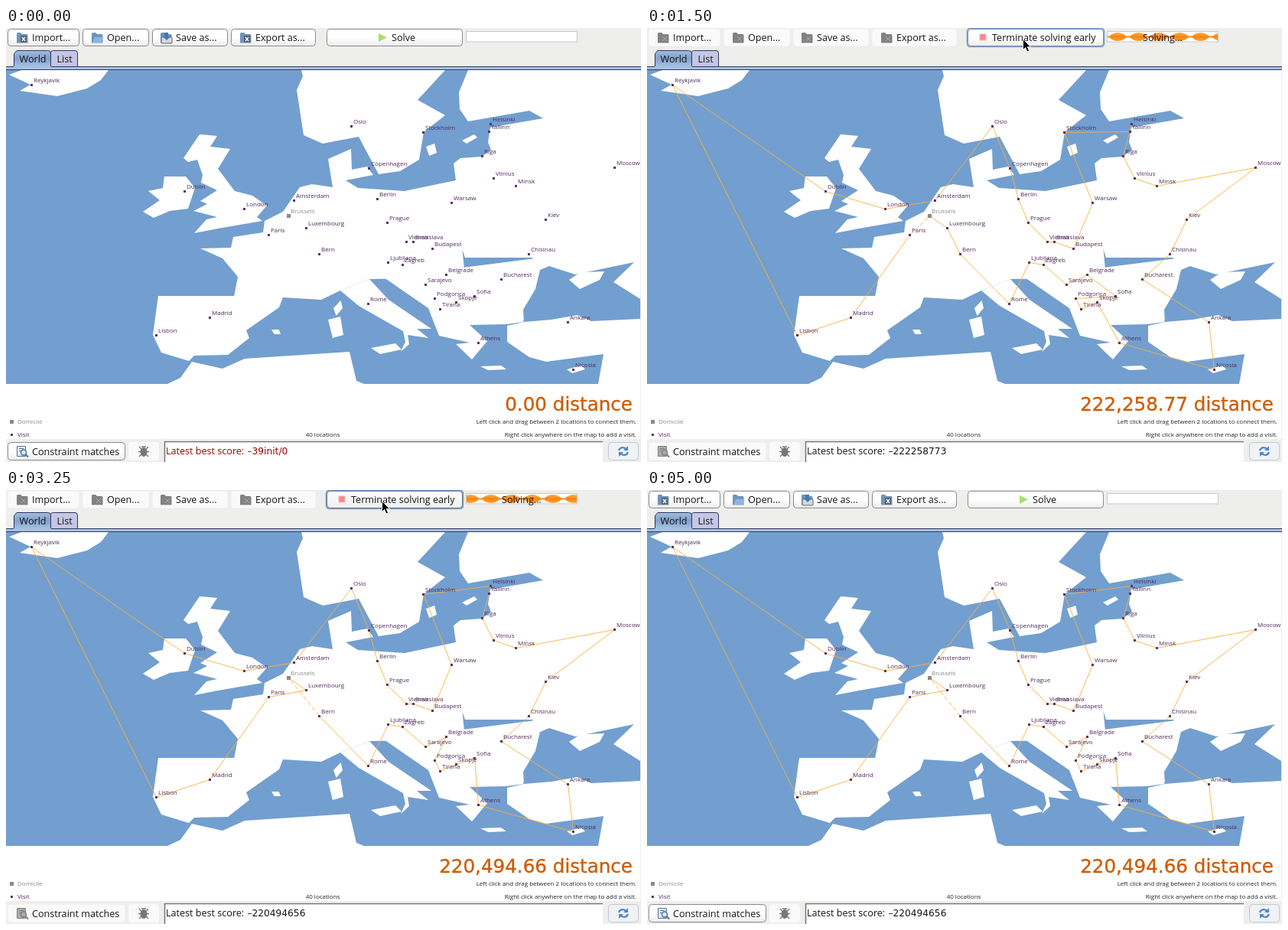
Animation, 830 px wide and 567 px high, one loop 5.25 s. Source, as an HTML page:

```html
<!DOCTYPE html>
<html lang="en">
<head>
<meta charset="utf-8">
<title>Route planner</title>
<style>
html, body { margin: 0; width: 100%; height: 100%; overflow: hidden; background: #eee; }
svg { display: block; }
text { font-family: "Open Sans", "Noto Sans", sans-serif; font-size: 12.6px; fill: #161616; white-space: pre; }
.map text { font-size: 8px; fill: #1e2426; }
.map .city { fill: #5c3566; }
.map text.city { fill: #4e2859; }
.map .home { fill: #888a85; }
.map .total { font: 24.6px "DejaVu Sans", sans-serif; fill: #ce5c00; stroke: #ce5c00; stroke-width: .35; }
.num { font: 12.2px "DejaVu Sans", sans-serif; }
.red text { fill: #a40000; }
.end { text-anchor: end; }
.mid { text-anchor: middle; }
.land { fill: #fff; }
.sea { fill: #729fcf; }
.route { fill: none; stroke: #fcaf3e; stroke-width: .9; }
.face { fill: url(#face); stroke: #8b8b8b; }
.flat { fill: #fafafa; }
</style>
</head>
<body>
<svg width="830" height="567" viewBox="0 0 830 567">
<defs>
  <linearGradient id="face" x2="0" y2="1">
    <stop offset=".5" stop-color="#fff"/><stop offset="1" stop-color="#ececec"/>
  </linearGradient>
  <linearGradient id="hot" x2="0" y2="1">
    <stop offset="0" stop-color="#fff"/><stop offset="1" stop-color="#eee"/>
  </linearGradient>
  <linearGradient id="tab" x2="0" y2="1">
    <stop offset="0" stop-color="#a3bcdf"/><stop offset=".5" stop-color="#81a1cb"/><stop offset="1" stop-color="#a3bfe3"/>
  </linearGradient>
  <linearGradient id="amber" x2="0" y2="1">
    <stop offset="0" stop-color="#ffb050"/><stop offset=".5" stop-color="#f88510"/><stop offset="1" stop-color="#ffa43c"/>
  </linearGradient>
  <clipPath id="barClip"><rect x="602" y="6" width="144" height="11"/></clipPath>
  <clipPath id="mapClip"><rect y="55" width="829" height="482"/></clipPath>
  <path id="folder" d="M0 2.500Q0 1 1.500 1H5L7 3H13Q14.500 3 14.500 4.500V14.500H0Z"/>
</defs>
<rect width="830" height="567" fill="#eeeeed"/>
<g id="tools"></g>

<g stroke="#30365e">
  <path d="M58.500 50V32.500Q58.500 29.500 61.500 29.500H90Q93.500 29.500 93.500 33V50" fill="#c6c6e6"/>
  <path d="M10.500 50V33.500L14 29.500H54.500Q58.500 29.500 58.500 33V50" fill="url(#tab)"/>
</g>
<rect y="50" width="830" height="5" fill="#a5c0e2"/>
<path d="M0 50.500H10M59 50.500H830M0 54.500H830" stroke="#343c5c"/>
<text x="17.500" y="45">World</text>
<text x="66.500" y="45">List</text>

<g class="map" clip-path="url(#mapClip)">
  <rect class="land" y="55" width="829" height="482"/>
  <rect class="sea" y="55" width="829" height="410"/>
  <g id="land"></g>
  <g id="routes"></g>
  <g id="cities"></g>
  <rect x="5" y="512" width="5" height="5" fill="#888a85"/>
  <rect x="6" y="530" width="3" height="3" fill="#5c3566"/>
  <text class="home" x="15" y="517">Domicile</text>
  <text class="city" x="15" y="534">Visit</text>
  <text class="mid" x="414" y="534">40 locations</text>
  <text class="end" x="824" y="517">Left click and drag between 2 locations to connect them.</text>
  <text class="end" x="824" y="534">Right click anywhere on the map to add a visit.</text>
</g>

<rect x="207" y="539" width="573" height="28" fill="#fff"/>
<path d="M207.500 567V540.500H780" fill="none" stroke="#73736f" stroke-width="1.500"/>
<g id="scores"></g>

<rect class="flat" x="160" y="541" width="40" height="24" rx="4"/>
<g fill="#777" stroke="#777">
  <ellipse cx="180" cy="554" rx="4" ry="5.500"/>
  <path d="M174 547L186 560M186 547L174 560M173 553.500H187M177 547H183" fill="none" stroke-width="1.300"/>
</g>
<rect x="787.500" y="541.500" width="39" height="23" rx="4" fill="#f0f2f5" stroke="#c3c8ce"/>
<g fill="none" stroke="#4b86cc" stroke-width="2.300">
  <path d="M801 552Q803 547 808 548.500L811 550M813 554Q811 559 806 557.500L803 556"/>
  <path d="M813 546V552H807ZM801 560V554H807Z" fill="#4b86cc" stroke="none"/>
</g>

<rect x="601.500" y="4.500" width="145" height="13.500" fill="#fff" stroke="#c9c9c9"/>
<g data-on="1000-4000">
  <path id="wave" fill="url(#amber)" clip-path="url(#barClip)"/>
  <text class="mid" x="674" y="16.500">Solving...</text>
</g>
<path data-on="750-4500" d="M491.500 14.500V28.500L494.600 25.600L497 31L499.600 29.900L497.300 24.700H501.500Z" fill="#000" stroke="#fff" stroke-width=".9"/>
</svg>

<script>
const LOOP = 5250, START = 1000, STOP = 4000;
const $ = id => document.getElementById(id);
const add = (id, html) => $(id).insertAdjacentHTML("beforeend", html);
const during = (from, to, html) => `<g data-on="${from}-${to}">${html}</g>`;
const idle = html => during(0, START, html) + during(STOP, LOOP, html);
const busy = html => during(START, STOP, html);
const box = (x, y, w, h, attrs) =>
  `<rect x="${x + .5}" y="${y + .5}" width="${w - 1}" height="${h - 1}" rx="4" ${attrs}/>`;
const label = (x, y, s, cls = "") => `<text class="${cls}" x="${x}" y="${y}">${s}</text>`;

// Toolbar
const tool = (x, w, name, textX, mark) => {
  const icon = (color, top) =>
    `<g transform="translate(${textX - 20} 5)"><use href="#folder" fill="${color}"/>${top}</g>`;
  add("tools",
    idle(box(x, 1, w, 23, 'class="face"') + icon("#6f93bd", mark)) +
    busy(box(x, 1, w, 23, 'class="flat"') + icon("#828282", '<path d="M6 6L12 12M12 6L6 12" stroke="#a9a9a9"/>')) +
    label(textX, 17, name));
};
const cross = '<rect x="5" y="5" width="8" height="9" fill="#5b626c"/><path d="M7 7L11 12M11 7L7 12" stroke="#fff" stroke-width="1.300"/>';
const lid = '<path d="M1 14L4 7H15.500L13 14Z" fill="#8db4e2"/>';
const drop = '<rect x="1" y="7" width="14" height="8" rx="1" fill="#d5d9de" stroke="#666"/><path d="M5 1H10V6H13L8 11L3 6H5Z" fill="#3f7ab8"/>';
tool(2, 94, "Import...", 34, cross);
tool(100, 87, "Open...", 132, lid);
tool(191, 99, "Save as...", 222, drop);
tool(294, 111, "Export as...", 326, cross);

// Solve / terminate button
const ring = box(418, 0, 180, 25, 'fill="none" stroke="#7b9dca" stroke-width="1.600"');
const hot = stroke => box(419, 1, 178, 23, `fill="url(#hot)" stroke="${stroke}"`);
add("tools",
  box(419, 1, 178, 23, 'class="face"') +
  during(500, 1250, hot("#8b8b8b")) + during(2750, STOP, hot("#5d6f68")) +
  during(750, START, ring) + during(1250, 5000, ring) +
  idle('<path d="M487 7L498 12.500L487 18Z" fill="#a5e06c"/>' + label(504, 17, "Solve")) +
  busy('<rect x="435" y="8" width="8" height="8" fill="#f48a8a" stroke="#f9b5b5"/>' +
    label(451, 17, "Terminate solving early")));

// Constraint matches button
const sheet = (page, ink) =>
  `<g fill="${page}" stroke="${ink}"><path d="M14.500 546.500H25.500V559.500H14.500ZM17 549.500H23M17 552.500H20"/>
   <circle cx="23" cy="554.500" r="3.500" stroke-width="1.500"/><path d="M25.500 557L29 560.500" stroke-width="2"/></g>`;
add("tools",
  idle(box(2, 541, 154, 24, 'class="face"') + sheet("#e3edf8", "#4d7299")) +
  busy(box(2, 541, 154, 24, 'class="flat"') + sheet("#aaa", "#808080")) +
  label(34, 557.5, "Constraint matches"));

// Map: each coast is a few key points, small islands are skewed quads
const poly = (points, cls = "land") => add("land", `<polygon class="${cls}" points="${points}"/>`);
const isle = (x, y, w, h, skew = 0) =>
  poly([x - w, y + skew, x + w * .6, y - h, x + w, y - skew, x - w * .4, y + h]);

const iceland = "20 55 134 55 124 68 106 79 67 89 18 82 32 74 4 61";
const ireland = "207 194 235 194 247 209 238 236 214 239 193 248 179 240 201 225 186 213 205 209";
const britain = "253 139 276 141 267 155 293 158 277 184 299 213 322 219 341 232 328 247 335 252 277 262 246 268 262 250 276 247 245 239 263 230 254 226 276 212 255 202 257 192 250 172 238 175 232 170";
const scandinavia = "386 55 388 63 380 81 389 140 414 151 461 142 487 191 515 187 540 172 546 136 574 114 538 94 574 55";
const east = "604 55 592 84 593 106 604 122 684 108 702 118 633 130 630 149 634 159 622 168 594 170 585 177 588 199 570 209 600 300 829 300 829 55";
const north = "588 199 521 213 460 209 444 199 480 192 472 181 452 185 451 158 421 171 427 208 400 204 384 208 362 240 338 252 336 267 297 273 294 287 254 288 283 301 303 325 298 351 362 352 412 355 437 343 475 328 600 326";
const iberia = "199 350 192 401 203 424 239 435 246 428 290 427 318 405 314 395 357 365 370 330 298 350";
const italy = "437 343 461 363 519 396 522 410 516 423 527 413 525 401 552 405 537 393 556 393 500 355 475 328";
const balkans = "494 326 552 366 566 402 606 411 588 413 609 433 629 409 606 388 654 387 676 384 700 300";
const anatolia = "655 389 655 410 684 430 706 436 781 426 774 465 829 465 829 290 690 290 677 384";
const africa = "211 465 228 457 243 436 283 445 312 432 449 423 458 461 468 465";
const blackSea = "676 368 692 341 698 316 710 311 744 322 821 306 794 332 829 354 829 380 765 383 747 375 713 381 677 384";
const crimea = "736 329 751 319 782 318 776 329 750 341";

[iceland, ireland, britain, scandinavia, east, north, iberia, italy, balkans, anatolia, africa].forEach(p => poly(p));
poly(blackSea, "sea");
poly(crimea);
isle(556, 159, 7, 8, -4);   // Gotland
isle(606, 145, 10, 6, 2);   // Saaremaa
isle(434, 366, 6, 10);      // Corsica
isle(431, 391, 10, 14, -10); // Sardinia
isle(353, 397, 6, 3, -3);   // Mallorca
isle(497, 419, 20, 7, -1);  // Sicily
isle(637, 444, 17, 3, -2);  // Crete
isle(745, 446, 12, 5);      // Cyprus

// Cities, in the order of the best tour
const places = `Brussels 369 245,Luxembourg 392 261,Paris 343 270,Madrid 266 378,Lisbon 196 401,Reykjavik 33 74,
Dublin 233 213,London 311 236,Amsterdam 376 225,Oslo 451 128,Copenhagen 474 183,Berlin 485 223,Prague 498 254,
Vienna 523 279,Bratislava 532 279,Budapest 557 288,Warsaw 582 228,Stockholm 545 136,Helsinki 633 125,Tallinn 631 135,
Riga 622 167,Vilnius 637 196,Minsk 666 206,Moscow 795 182,Kiev 705 250,Chisinau 683 295,Bucharest 647 328,
Ankara 734 384,Nicosia 741 446,Athens 617 411,Sofia 612 350,Skopje 588 358,Tirana 567 367,Podgorica 560 353,
Belgrade 575 322,Sarajevo 548 335,Zagreb 518 309,Ljubljana 499 306,Rome 473 360,Bern 409 295`;
const cities = places.split(",").map(place => {
  const [name, x, y] = place.trim().split(" ");
  return { name, x: +x, y: +y };
});
cities.forEach(({ name, x, y }, i) => {
  const r = i ? 1 : 2, cls = i ? "city" : "home";
  add("cities", `<rect class="${cls}" x="${x - r}" y="${y - r}" width="${2 * r + 1}" height="${2 * r + 1}"/>` +
    label(x + 3, y - 3, name, cls));
});

// Tours start at home; the closing leg is dashed
const move = (tour, name, after) => {
  const city = tour.find(c => c.name === name);
  return tour.flatMap(c => c === city ? [] : c.name === after ? [c, city] : [c]);
};
const flip = ([home, ...rest]) => [home, ...rest.reverse()];
const line = (stops, attrs = "") =>
  `<polyline class="route" points="${stops.map(c => [c.x + .5, c.y + .5]).join(" ")}" ${attrs}/>`;
const drawTour = tour => line(tour) + line([tour.at(-1), tour[0]], 'stroke-dasharray="6 3"');

const early = move(move(cities, "Sofia", "Podgorica"), "Tallinn", "Stockholm");
const stage = (from, to, distance, score, tour, cls = "") => {
  if (tour) add("routes", during(from, to, drawTour(tour)));
  add("scores", during(from, to, `<g class="${cls}">` + label(209, 557, "Latest best score:") +
    label(315.5, 557, "–" + score, "num") + "</g>"));
  add("cities", during(from, to, label(819, 500, distance + " distance", "total end")));
};
stage(0, 1250, "0.00", "39init/0", null, "red");
stage(1250, 1500, "226,731.42", "226731418", move(early, "Paris", "Bern"));
stage(1500, 1750, "222,258.77", "222258773", flip(move(early, "Luxembourg", "Bern")));
stage(1750, LOOP, "220,494.66", "220494656", cities);

// Progress bar: a chain of lens-shaped beads that moves on every quarter second
const PITCH = 27, STRIDE = 14.2;
const bead = x => `M${x - 14} 10.500H${x - 11}Q${x - 6} 6 ${x} 6T${x + 11} 10.500H${x + 14}V12.500H${x + 11}Q${x + 6} 17 ${x} 17T${x - 11} 12.500H${x - 14}Z`
  .replace(/T(\S+)/g, (_, end) => `Q${x + (end > x ? 6 : -6)} ${end > x ? 6 : 17} ${end}`);
const chain = step => Array.from({ length: 9 }, (_, i) => bead(560 + (step * STRIDE) % PITCH + i * PITCH)).join("");

const timed = [...document.querySelectorAll("[data-on]")]
  .map(el => [el, ...el.dataset.on.split("-").map(Number)]);
const begin = performance.now();
function tick() {
  const t = (performance.now() - begin) % LOOP;
  for (const [el, from, to] of timed) el.style.display = t >= from && t < to ? "" : "none";
  if (t >= START && t < STOP) $("wave").setAttribute("d", chain(Math.floor((t - START) / 250)));
  requestAnimationFrame(tick);
}
tick();
</script>
</body>
</html>
```
